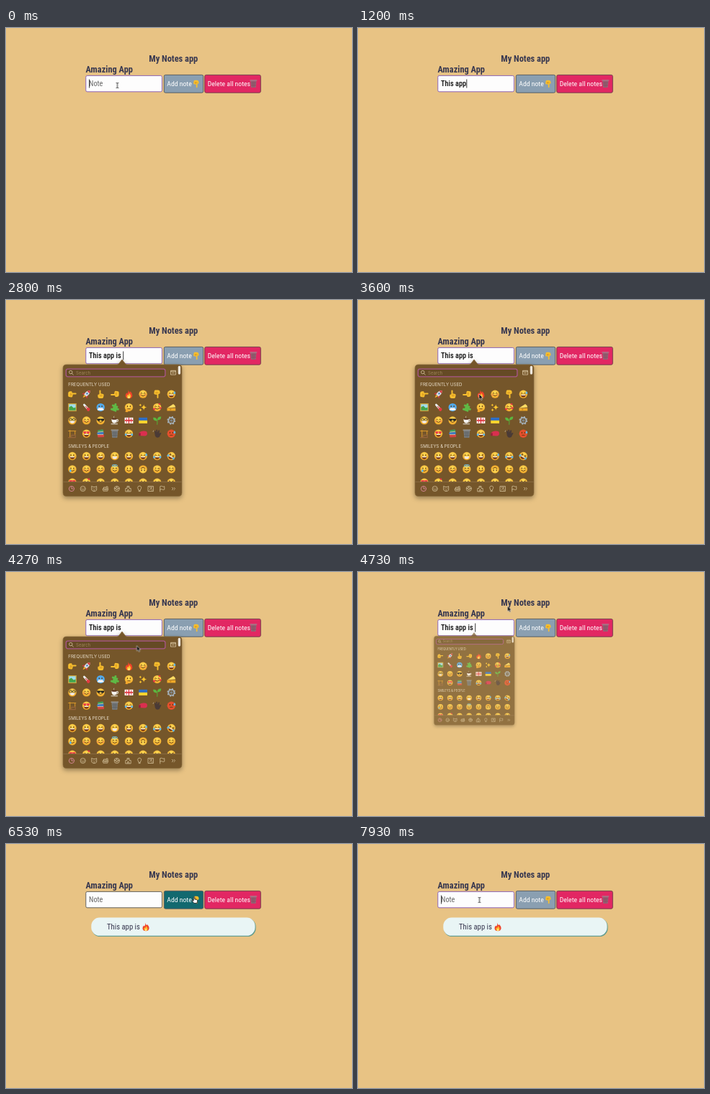
Write an HTML page that moves like this. It is 480 px wide and 340 px high and loops after 8 s.

```html
<!DOCTYPE html>
<html lang="en">
<head>
<meta charset="utf-8">
<title>My Notes app</title>
<style>
html, body { margin: 0; width: 100%; height: 100%; overflow: hidden; background: #e8c384; }
svg { display: block; }
text { font-family: "Roboto Condensed", Roboto, sans-serif; font-stretch: 75%; white-space: pre; }
.title { font-size: 12.4px; font-weight: 700; fill: #383850; }
.label { font-size: 9.7px; font-weight: 400; fill: #fff; }
.field { font-size: 10.3px; font-weight: 500; fill: #111; }
.note { font-size: 10.7px; font-weight: 400; fill: #383850; }
#picker text { font-family: Inter, sans-serif; font-stretch: normal; font-size: 6.1px; fill: #eadfcb; }
.line { fill: none; stroke: #dccaa5; stroke-width: .8; stroke-linejoin: round; }

#picker, #cursor, #beam, #arrow, #hand, #card, #add, #input { animation: 8s linear infinite; }
#beam, #arrow, #hand, #card, #input { animation-timing-function: step-end; }
#picker { transform-origin: 161px 83px; animation-name: popover; }
#cursor { animation-name: move; }
#beam { animation-name: beam; }
#arrow { animation-name: arrow; }
#hand { animation-name: hand; }
#card { animation-name: card; }
#add { animation-name: hover; }
#input { animation-name: focus; }

@keyframes popover {
  0%, 31.6% { transform: scale(.3); opacity: 0; }
  33.6% { transform: scale(1.04); opacity: 1; }
  35%, 58.2% { transform: scale(1); opacity: 1; }
  59.1% { transform: translateY(1.5px) scale(.688); opacity: .78; }
  60%, 100% { transform: translateY(3px) scale(.4); opacity: 0; }
}
@keyframes move {
  0%, .9% { transform: translate(154.5px, 80px); }
  1.7%, 35.9% { transform: translate(202px, 85px); animation-timing-function: ease-in-out; }
  43.7%, 51.2% { transform: translate(168px, 131px); animation-timing-function: ease-in-out; }
  56.6%, 60.9% { transform: translate(207.5px, 47.5px); animation-timing-function: ease-in-out; }
  67.5%, 81.9% { transform: translate(261px, 74px); }
  85% { transform: translate(273px, 108px); }
  91.6%, 95.8% { transform: translate(226px, 112px); }
  96.6%, 98.3% { transform: translate(212px, 80px); }
  99%, 100% { transform: translate(168.5px, 78px); }
}
@keyframes beam { 0% { opacity: 1; } 4.1% { opacity: 0; } 96.6%, 100% { opacity: 1; } }
@keyframes arrow {
  0% { opacity: 0; } 35.9% { opacity: 1; } 66.4% { opacity: 0; }
  82.6% { opacity: 1; } 96.6%, 100% { opacity: 0; }
}
@keyframes hand { 0% { opacity: 0; } 66.4% { opacity: 1; } 82.6%, 100% { opacity: 0; } }
@keyframes card { 0% { opacity: 0; } 77.5%, 100% { opacity: 1; } }
@keyframes hover {
  0%, 65.5% { fill: #8a9fb1; }
  68.3%, 82.5% { fill: #12696f; }
  87.5%, 100% { fill: #8a9fb1; }
}
@keyframes focus { 0% { stroke: #8358b8; } 77.5% { stroke: #555; } 96.6%, 100% { stroke: #8358b8; } }
</style>
</head>
<body>
<svg width="480" height="340" viewBox="0 0 480 340">
  <defs>
    <radialGradient id="skin" cy=".35" r=".7">
      <stop offset="0" stop-color="#ffe15a"/><stop offset="1" stop-color="#efa023"/>
    </radialGradient>
    <clipPath id="list"><path d="M79 90h165v163h-165z"/></clipPath>
    <filter id="shade" x="-10%" y="-10%" width="120%" height="125%">
      <feDropShadow dx="0" dy="2.5" stdDeviation="3" flood-opacity=".35"/>
    </filter>
  </defs>

  <text class="title" x="198.3" y="47.4">My Notes app</text>
  <text class="title" x="110.5" y="61.5">Amazing App</text>

  <rect id="input" x="110.8" y="66.4" width="105.6" height="22.4" rx="2" fill="#fdfdfd" stroke-width=".9"/>
  <text id="entry" class="field" x="115" y="81.2"></text>
  <g id="typedFire"></g>
  <path id="caret" d="M0 71.5v12" stroke="#222" stroke-width=".9"/>

  <rect id="add" x="219.3" y="65.4" width="54.4" height="24.8" rx="2" stroke="#4f565d" stroke-width=".9"/>
  <text class="label" x="223.3" y="81.2">Add note</text>
  <rect x="275.7" y="65.4" width="77.6" height="24.8" rx="2" fill="#e22763" stroke="#6b3a48" stroke-width=".9"/>
  <text class="label" x="279.8" y="81.2">Delete all notes</text>
  <g id="icons"></g>

  <g id="card">
    <rect x="119" y="103.6" width="227.6" height="25.4" rx="11.5" fill="#639d90"/>
    <rect x="118.3" y="102.6" width="227.2" height="25.2" rx="11.5" fill="#e9f5f5"/>
    <text class="note" x="140" y="119.4">This app is</text>
    <g id="noteFire"></g>
  </g>

  <g id="picker">
    <path filter="url(#shade)" fill="#75572c" stroke="#8b6c3d" stroke-width=".7"
      d="M84 90h70q2 0 3-2l4-5 4 5q1 2 3 2h71q5 0 5 5v173.500q0 5-5 5h-155q-5 0-5-5v-173.500q0-5 5-5z"/>
    <rect x="83.3" y="96.2" width="137.6" height="10.6" rx="2.5" fill="#654a25" stroke="#a8558c" stroke-width="1.3"/>
    <path class="line" d="M91.4 102.2l2.2 2.3M92 100.6a2.2 2.2 0 1 1-4.4 0a2.2 2.2 0 1 1 4.4 0"/>
    <text x="97" y="103.6" style="fill:#9d8558">Search</text>
    <path class="line" d="M228.5 98.3h7v5.8h-7zM228.5 99.6h7M230 101.7h4"/>
    <rect x="238.7" y="91.8" width="3.4" height="12" rx="1.7" fill="#ede6db"/>
    <text x="86.3" y="119.6">FREQUENTLY USED</text>
    <text x="86.3" y="205.6">SMILEYS &amp; PEOPLE</text>
    <g id="grid" clip-path="url(#list)"></g>
    <path d="M79.4 253.5h164.2" stroke="#8d7047" stroke-width=".8"/>
    <g id="tabs"></g>
  </g>

  <g id="cursor">
    <g id="beam"><path d="M-1.7-3.6q1.7 0 1.7 1v5.2q0 1-1.7 1M1.7-3.6q-1.7 0-1.7 1M1.7 3.6q-1.7 0-1.7-1" fill="none" stroke="#222" stroke-width=".9"/></g>
    <g id="arrow"><path d="M0 0v7.4l1.7-1.5 1.2 2.7 1.4-.6-1.2-2.6h2.3z" fill="#111" stroke="#fff" stroke-width=".5"/></g>
    <g id="hand"><path d="M-.8 0q.8-.9 1.6 0v3l3 .7q1 .3.8 1.5l-.6 3.2h-4.3l-2.5-3.2q-.3-1 .8-.9l1.2.9z" fill="#fff" stroke="#111" stroke-width=".8"/></g>
  </g>
</svg>
<script>
const $ = id => document.getElementById(id);
const fill = (d, color) => `<path d="${d}" fill="${color}"/>`;
const pen = (d, color = '#6a3d12', w = .9) =>
  `<path d="${d}" fill="none" stroke="${color}" stroke-width="${w}" stroke-linecap="round"/>`;
const put = (art, x, y, k = 1, turn = 0) =>
  `<g transform="translate(${x} ${y}) scale(${k}) rotate(${turn})">${art}</g>`;

const heart = fill('M0 1.8l-2-2.2q0-1.6 1.2-1.4l.8.7.8-.7q1.2-.2 1.2 1.4z', '#ea3048');
const drop = fill('M0-1.8q1.5 2 1.3 2.6a1.3 1.3 0 0 1-2.6 0q0-.7 1.3-2.6', '#5bb8ee');
const both = (art, x, y) => put(art, -x, y) + put(art, x, y);

const eyes = {
  dot: pen('M-1.8-1.7v.9M1.8-1.7v.9', '#6a3d12', 1.2),
  arc: pen('M-2.9-1q1-1.5 2 0M.9-1q1-1.5 2 0'),
  shut: pen('M-2.9-2.1l1.7.9-1.7.9M2.9-2.1l-1.7.9 1.7.9'),
  wink: pen('M-1.8-1.7v.9M.9-1h2'),
  love: both(heart, 2.1, -1.3),
  shades: fill('M-4.9-2.2h9.8q-.3 3-2.5 3t-2.4-2q-.4 2-2.4 2t-2.5-3', '#222'),
  nerd: pen('M-.5-1.2a1.7 1.7 0 1 1-3.4 0a1.7 1.7 0 1 1 3.4 0M3.9-1.2a1.7 1.7 0 1 1-3.4 0a1.7 1.7 0 1 1 3.4 0', '#333', .8)
};
const mouths = {
  smile: pen('M-2.5 1.3q2.5 2.5 5 0'),
  open: fill('M-3.2.5h6.4q-.2 3.6-3.2 3.6t-3.2-3.6', '#7a3b16') + fill('M-2.8.6h5.6v1h-5.6z', '#fff'),
  teeth: fill('M-3.2.6h6.4q-.3 3-3.2 3t-3.2-3', '#fff') + pen('M-2.8 1.9h5.6', '#a77', .3),
  flat: pen('M-1.6 2h3.2')
};
const extras = {
  sweat: put(drop, 4.2, -2.2),
  tear: put(drop, -2.5, 1.5),
  tears: both(drop, 4, .8),
  halo: '<ellipse cy="-4.8" rx="3.6" ry="1.1" fill="none" stroke="#67c4ee" stroke-width=".9"/>',
  hearts: put(heart, -3.9, 2.5, .8) + put(heart, 4, 1.2, .8) + put(heart, 3, -4, .7),
  palm: fill('M-4.6 6l.6-2.6 3.3-1.3.5 1-1.5.8q1.5 2-.3 2.3z', '#f4a62c'),
  blush: both('<circle r="1.1" fill="#f08050" opacity=".7"/>', 3.4, 1),
  ice: fill('M-4 2h8v1.8h-8z', '#fff')
};
const face = (eye, mouth, extra, skin = 'url(#skin)') =>
  `<circle r="5.3" fill="${skin}"/>` + eyes[eye] + mouths[mouth] + (extras[extra] || '');

const point = fill('M-1 5.4q-2.6-.2-2.6-2.6v-2l2-.8v-4.8q.9-1.2 1.8 0v4l3 .6q1 .3.9 1.5l-.5 2.8q-.3 1.3-1.5 1.3z', '#f8bf2e')
  + pen('M.3.8v1.8M1.7 1v1.7M-1.5 1.5l1 1', '#bd7a17', .5);
const fire = fill('M-.8-5.8q.4 2.5 2 3.6l.8-1.4q2.9 3 2.6 5.6q-.5 3.7-4.4 3.8-4.3-.1-4.7-3.9 0-2 1.6-3.8l.7 1.3q1.9-1.8 1.4-5.2', '#f0442a')
  + fill('M.3-1.5q2.6 2.6 2.4 4.4-.3 2.5-2.7 2.6-2.6 0-2.7-2.4 0-1.3 1.2-2.5l.6.8q1.2-1.1 1.2-2.9', '#ffb52b')
  + fill('M.2 2q2.5 3.5-.2 3.5t.2-3.5', '#ffeb80');
const bin = fill('M-4.2-4.6h8.4l-1 10h-6.4z', '#7d7f80')
  + pen('M-2-3l.5 7.6M0-3v7.6M2-3l-.5 7.6M-3.5-1h7M-3.3 2h6.6', '#505557', .5) + pen('M-4.5-4.7h9', '#9a9c9c', 1.2);
const rocket = put(fill('M0-6q3 3 2 8h-4q-1-5 2-8', '#d9dee4') + fill('M-2-.5l-2 3.5h2zM2-.5l2 3.5h-2zM0-6q1.5 1.5 1.9 3h-3.8q.4-1.5 1.9-3', '#d33a3c')
  + fill('M-1.3 2.3h2.6l-1.3 3.6z', '#ffae2c') + '<circle cy="-1" r="1" fill="#3d7bb8"/>', 0, 0, 1.15, 45);
const picture = fill('M-5.5-5.2h11v10.4h-11z', '#c9a23a') + fill('M-4.3-4h8.6v8h-8.6z', '#9fdced') + fill('M-4.3 4v-4l3-2 3 3 2.6-1v4z', '#43a548');
const thermo = put(pen('M0-4.5v7', '#e9eef0', 2.6) + '<circle cy="3.6" r="2.2" fill="#e33a40"/>' + pen('M0-1.5v5', '#e33a40', 1), 0, 0, 1, -42);
const puzzle = put(fill('M-4.2-2.8h2.6q-1-2.4 1.2-2.5 2.2.1 1.2 2.5h2.9v2.6q2.4-1 2.5 1.2-.1 2.2-2.5 1.2v2.8h-7.9v-2.8q2.2.8 2.2-1.2t-2.2-1z', '#5fb945'), 0, 0, 1, 20);
const star = k => fill(`M0-${k}q.3 ${k - .3} ${k} ${k}-${k - .3}.3-${k} ${k}-.3-${k - .3}-${k}-${k} ${k - .3}-.3 ${k}-${k}`, '#ffc62e');
const sparkles = put(star(4), 1, 0) + put(star(1.8), -3.5, -3) + put(star(1.8), -3.3, 3.5);
const cheese = fill('M-5.5 1l8-5.2q2.6 1.2 3 4.2z', '#ffdc62') + fill('M-5.5 1h11v3.6h-11z', '#efa928') + '<circle cx="-1" cy="2.8" r="1" fill="#c98319"/>';
const coffee = fill('M-4.2-2h7.2q0 5.6-3.6 5.6t-3.6-5.6', '#f4f2ee') + pen('M3-1.2q2.3 0 .7 2.6l-1.3.5M-4.5 4.6h8', '#e6e2dc', 1)
  + '<ellipse cx="-.6" cy="-2" rx="3.5" ry=".9" fill="#5b321c"/>' + pen('M-1-3.5q-1-1 0-2', '#ddd', .6);
const flagRed = fill('M-5.5-3.8h11v7.6h-11z', '#fff') + pen('M0-3.2v6.4M-4.8 0h9.6', '#e0343c', 1.5) + both(pen('M0-2.7v1.4M0 1.3v1.4', '#e0343c', 1), 3, 0);
const flagBlue = fill('M-5.5-3.8h11v3.8h-11z', '#2f6fc4') + fill('M-5.5 0h11v3.8h-11z', '#ffd42e');
const sprout = pen('M0 5q.4-3 0-5', '#5d9a34', 1.2) + fill('M0 .5q-5.4.5-5.2-4.3 5-.5 5.2 4.3M0-.5q.2-4.8 5.2-4.5 0 5-5.2 4.5', '#5cb53f');
const gear = '<circle r="3.8" fill="none" stroke="#a9b7c2" stroke-width="1.5"/><circle r="4.9" fill="none" stroke="#a9b7c2" stroke-width="1.2" stroke-dasharray="1.9 1.95"/>'
  + pen('M0-3.3v6.6M-3-1.5l6 3M-3 1.5l6-3', '#8596a4', .7);
const crane = pen('M-3 5v-9.5M-5-3.5h9.5M3.5-3.5v4.5', '#d8972a', 1) + pen('M-5 5h9M-1 5v-3h5v3', '#96643c', 1.1);
const books = fill('M-4-4.5l7-1 1 2.6-7 1z', '#3fa059') + fill('M-4.5-1.6l8.5-.6v2.8h-8.5z', '#3c7cc3') + fill('M-4 1.6l8.5-.4v3.2l-8 .6z', '#d34541') + pen('M-3.5-2l6.8-.8M-3.8 1.2h7', '#f4ecd8', .6);
const glove = fill('M-5.5-.6q3-3.6 7-2.8 4 0 4 3.2t-3.6 3.3l-7.4-.6z', '#da2f4f') + fill('M-5.5-.8h2.3v3.6h-2.3z', '#8d2438');
const wave = fill('M-3.5-3l1.4-.9 1 2.4-.3-3.7h1.5l.7 3.5.9-3 1.4.3-.3 4.2 1.5-1.2 1 .9-2.5 5q-4.6 2-5.7-2.6z', '#4a3a36') + pen('M-4.7-4l-.6 1.5', '#d9d0c2', .5);

const happy = face('arc', 'smile', 'blush');
const recent = [
  put(point, 0, 0, 1, 90), rocket, point, put(point, 0, 0, 1, -90), fire, happy, put(point, 0, 0, 1, 180), face('arc', 'open', 'sweat'),
  picture, thermo, face('dot', 'teeth', 'ice', '#51a9ea'), puzzle, face('dot', 'flat', 'palm'), sparkles, face('arc', 'smile', 'hearts'), cheese,
  face('nerd', 'teeth'), happy, face('shades', 'smile'), coffee, flagRed, flagBlue, sprout, gear,
  crane, face('love', 'open'), books, bin, face('arc', 'open', 'tears'), glove, wave, face('dot', 'flat', 'sweat', '#e4502d')
];
const smileys = [
  face('dot', 'open'), face('dot', 'open'), face('arc', 'open'), face('arc', 'teeth'), face('shut', 'open'), face('arc', 'open', 'sweat'), face('arc', 'open', 'tears'), put(face('shut', 'open', 'tears'), 0, 0, 1, 30),
  face('dot', 'smile', 'tear'), happy, happy, face('arc', 'smile', 'halo'), face('dot', 'smile'), put(face('dot', 'smile'), 0, 0, 1, 180), face('wink', 'smile'), face('arc', 'smile'),
  face('love', 'open'), face('arc', 'smile', 'hearts'), face('arc', 'flat'), face('arc', 'flat'), face('arc', 'flat'), face('dot', 'smile'), face('wink', 'open'), face('shut', 'open')
];
const table = (list, top) => list.map((art, i) =>
  put(art, 92 + i % 8 * 19.62, top + (i >> 3) * 18.35, 1.07)).join('');
$('grid').innerHTML = table(recent, 131.2) + table(smileys, 217.5);

const ring = 'M3.6 0a3.6 3.6 0 1 1-7.2 0a3.6 3.6 0 1 1 7.2 0';
const tabs = [
  ring + 'M0-2.3v2.3h1.8',
  ring + 'M-1.3-1v.4M1.3-1v.4M-1.8 1q1.8 1.8 3.6 0',
  'M-3.3-3.5l1.8 1h3l1.8-1v5.5l-2 1.5h-2.6l-2-1.5zM-1.3-.3v.4M1.3-.3v.4M-.7 2h1.4',
  'M-3.7 0h7.4l-1 3.2h-5.4zM-2.7 0v-2h3M1-.2v-2.8h2v3M-2 1.5h4',
  ring + 'M0-1.5l1.5 1.2-.6 1.8h-1.8l-.6-1.8zM0-3.5v2M1.5-.3l2-.5M-1.5-.3l-2-.5',
  'M-3.7 3.5v-4h2.2v-3h3v3h2.2v4zM-1 3.5v-2h2v2M-.5-2h1',
  'M-1.2 2q0-1.2-1-2.2-1-3.4 2.2-3.6 3.2.2 2.2 3.6-1 1-1 2.2zM-1 3.6h2',
  'M-3.5-3.5h7v7h-7zM-2-1.8h1.5M.8-2v2M-2 1.8l3.6-3.6M1 1.8h1.3',
  'M-2.8 4v-7.3q1.5-1 3 0t3 0v4.3q-1.5 1-3 0t-3 0',
  'M-2-1.7l1.7 1.7-1.7 1.7M.6-1.7l1.7 1.7-1.7 1.7'
];
$('tabs').innerHTML = tabs.map((d, i) =>
  put(pen(d, i ? '#d3c09a' : '#e58fa5', .8), 91 + i * 15.7, 263)).join('');

$('icons').innerHTML = put(point, 264, 78, .95, 180) + `<g opacity=".7">${put(bin, 343.3, 77.6)}</g>`;
$('typedFire').innerHTML = put(fire, 167.2, 77.5);
$('noteFire').innerHTML = put(fire, 194, 115.5);

// One key press per character of the note
const note = 'This app is ';
const keys = [330, 470, 530, 670, 800, 930, 1070, 1200, 1330, 1530, 1600, 1730];
const PICKED = 4800, SENT = 6200, FOCUSED = 7730;
const entry = $('entry'), caret = $('caret');
let start;

function caretOn(t) {
  if (t < 1730) return true;
  if (t < PICKED) return (t - 1730) % 1000 < 500 || t >= 4700;
  if (t < SENT) return (t - PICKED) % 900 < 450;
  return t >= FOCUSED;
}

function draw(now) {
  start ??= now;
  const t = (now - start) % 8000;
  const typed = t < SENT ? note.slice(0, keys.filter(k => k <= t).length) : '';
  const hasFire = t >= PICKED && t < SENT;
  const shown = typed || 'Note';
  if (entry.textContent !== shown) entry.textContent = shown;
  entry.style.fill = typed ? '#111' : '#666';
  entry.style.fontWeight = typed ? 500 : 400;
  const end = typed ? entry.getComputedTextLength() : 0;
  caret.setAttribute('transform', `translate(${115.6 + (hasFire ? 57 : end)} 0)`);
  caret.style.opacity = caretOn(t) ? 1 : 0;
  $('typedFire').style.opacity = hasFire ? 1 : 0;
  requestAnimationFrame(draw);
}
requestAnimationFrame(draw);
</script>
</body>
</html>
```
